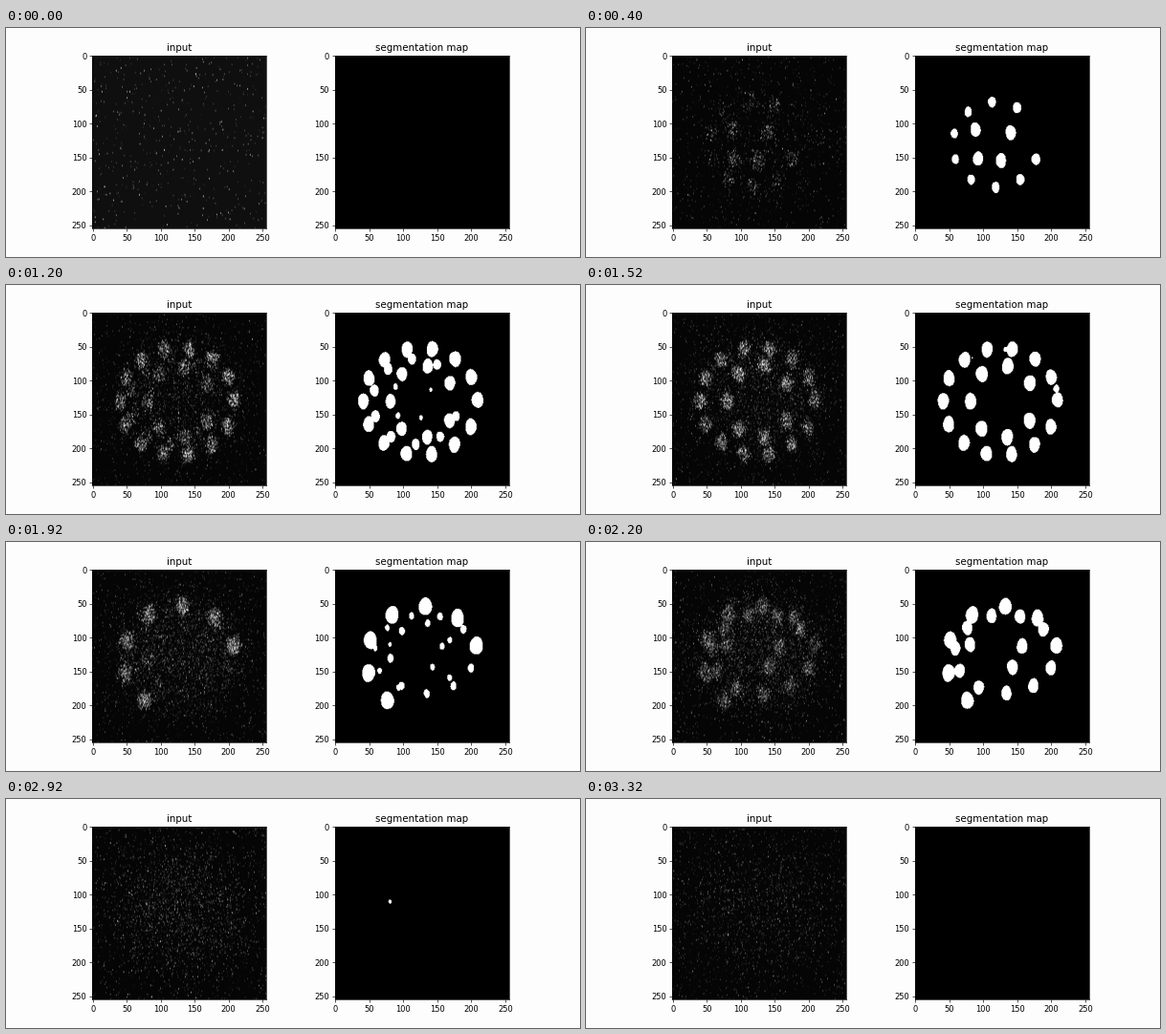
These frames come from a looping animation (600x240 px, 3.4 s). A matplotlib script:

```python
import numpy as np
import matplotlib.pyplot as plt
from matplotlib.animation import FuncAnimation

N = 256
SLICES = 34
STEP = 40            # ms per tick; slices alternate 3 and 2 ticks
TICKS = 85
HALF = 5.2           # half depth of a nucleus, in slices
TILT = 0.004         # the left side lies slightly deeper
ASPECT = 1.4

Y, X = np.mgrid[:N, :N].astype(float)


def ring(count, start, step, centre, radii, depth, size):
    """Nuclei spread along an elliptic arc, angles in degrees."""
    for ang in np.radians(start + step * np.arange(count)):
        x = centre[0] + radii[0] * np.cos(ang)
        y = centre[1] + radii[1] * np.sin(ang)
        yield x, y, depth + TILT * (N / 2 - x), size


def embryo():
    """Shells of nuclei from the upper cap down to the lower one."""
    yield from ring(9, 20, 35, (118, 132), (63, 63), 8, 9.2)
    yield from ring(4, 126, 100, (112, 130), (34, 28), 7, 9.5)
    yield from ring(14, 28, 25.4, (125, 132), (84, 79), 13.4, 8.7)
    yield from ring(7, 32, 49.5, (128, 132), (47, 53), 14.4, 8.7)
    yield from ring(7, 129, 36, (128, 133), (82, 78), 20, 9.8)
    yield from ring(10, 21, 33.4, (131, 125), (73, 58), 23.5, 8)
    yield from ring(3, 52, 147, (118, 121), (40, 30), 23.78, 8.5)


def build_nuclei():
    """Distance field, soft profile and depth of each nucleus."""
    rng = np.random.default_rng(4)
    nuclei = []
    for x, y, depth, size in embryo():
        u, v = (X - x) / size, (Y - y) / (size * ASPECT)
        dist, ang = np.hypot(u, v), np.arctan2(v, u)
        p, q = rng.uniform(0, 2 * np.pi, 2)
        wobble = 1 + 0.03 * np.cos(2 * ang + p) + 0.03 * np.cos(3 * ang + q)
        nuclei.append((dist / wobble, np.exp(-dist ** 4), depth))
    return nuclei


def streaks(rng, rate, amp):
    """Random photon hits smeared into short vertical streaks."""
    hits = (rng.random((N, N)) < rate) * rng.gamma(2, amp / 2, (N, N))
    return 0.5 * np.roll(hits, -1, 0) + hits + 0.6 * np.roll(hits, 1, 0)


def render(z, nuclei):
    rng = np.random.default_rng(100 + z)
    mask = np.zeros((N, N))
    glow = np.zeros((N, N))
    for dist, soft, depth in nuclei:
        t = (z - depth) / HALF
        if abs(t) < 1:
            mask[dist < np.sqrt(1 - t * t)] = 1
        glow = np.maximum(glow, soft * np.exp(-((z - depth) / 3) ** 2))

    body = np.exp(-(((X - 130) / 92) ** 2 + ((Y - 122) / 88) ** 2) ** 2)
    haze = np.interp(z, [0, 8, 19, 25, 33], [0, .03, .1, .1, .04])
    back = np.interp(z, [0, 8, 33], [.009, .015, .022])
    amp = np.interp(z, [0, 5, 19, 29, 33], [.36, .16, .18, .22, .18])
    bright = np.interp(z, [0, 5, 19, 25, 29], [.5, 1, .9, .45, .3])
    base = np.interp(z, [0, 4], [.06, .02])

    image = base + streaks(rng, back + haze * body, amp)
    image += streaks(rng, 0.6 * glow, 0.34 * bright)
    return np.clip(image, 0, 0.95), mask


nuclei = build_nuclei()
stack = [render(z, nuclei) for z in range(SLICES)]

fig, axes = plt.subplots(1, 2, figsize=(10, 4), dpi=60, facecolor="#fefdfe")
fig.subplots_adjust(left=0.126, right=0.901, bottom=0.123, top=0.88, wspace=0.2)
views = []
for ax, title, data in zip(axes, ("input", "segmentation map"), stack[0]):
    views.append(ax.imshow(data, cmap="gray", vmin=0, vmax=1))
    ax.set_title(title, fontsize=12.3)
    ax.set_xticks(range(0, N, 50))
    ax.set_yticks(range(0, N, 50))


def update(tick):
    z = tick // 5 * 2 + (tick % 5 >= 3)
    for view, data in zip(views, stack[z]):
        view.set_data(data)
    return views


anim = FuncAnimation(fig, update, frames=TICKS, interval=STEP, repeat=True)
plt.show()
```
